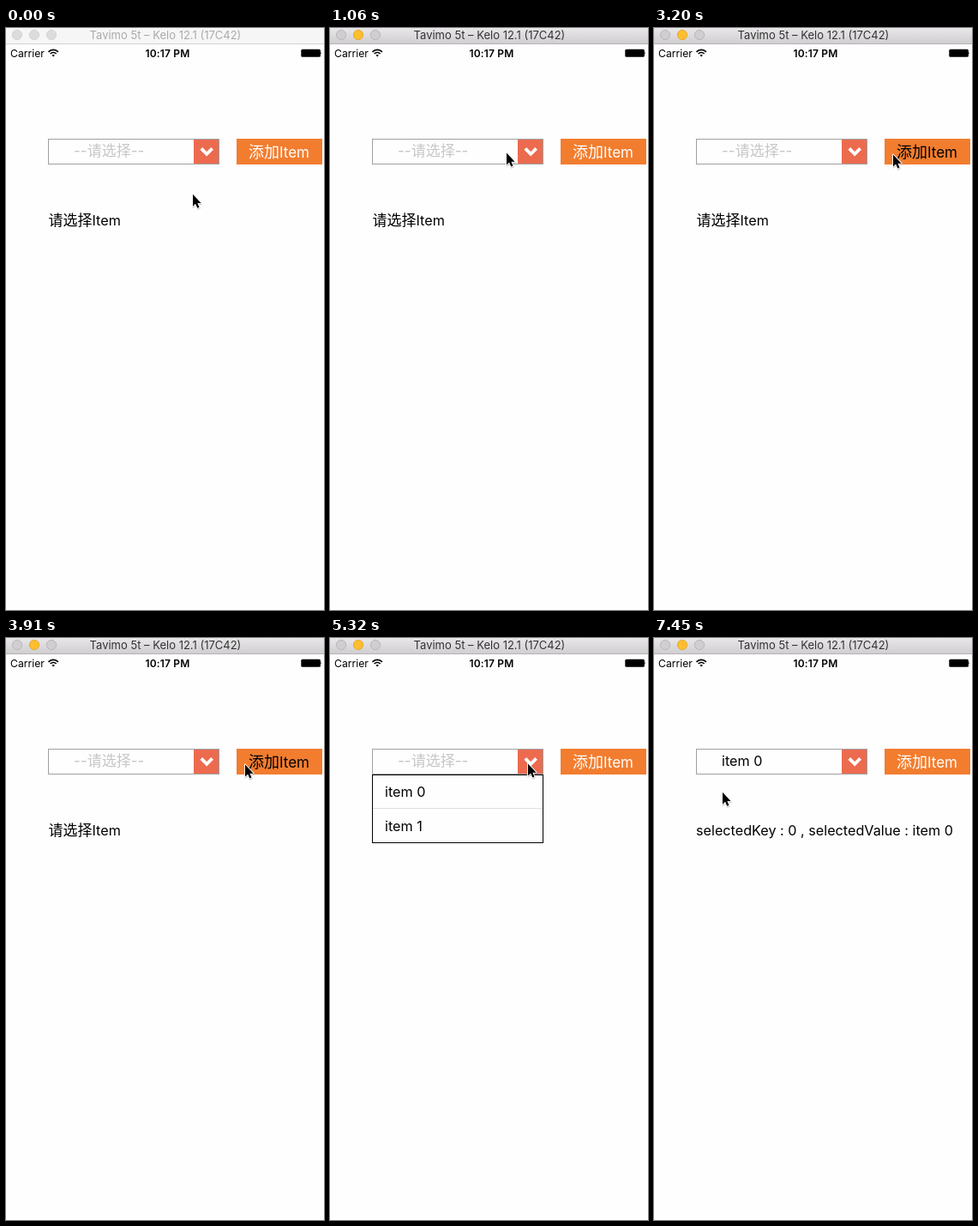
Animation, 371 px wide and 678 px high, one loop 8 s. Source, as an HTML page:

```html
<!DOCTYPE html>
<html lang="zh">
<head>
<meta charset="utf-8">
<title>Dropdown demo</title>
<style>
  html, body { margin: 0; width: 100%; height: 100%; overflow: hidden; background: #fefefe; }
  svg { display: block; width: 371px; height: 678px; }
  text { font: 16.2px Inter, "Noto Sans CJK SC", "Noto Sans CJK", sans-serif; white-space: pre; }
  .han { font-family: "Noto Sans CJK SC", "Noto Sans CJK", sans-serif; font-size: 17px; }
  .han tspan { font-family: Inter, sans-serif; }
</style>
</head>
<body>
<svg viewBox="0 0 371 678">
  <defs>
    <linearGradient id="chrome" x2="0" y2="1">
      <stop stop-color="#e9e7e9"/><stop offset="1" stop-color="#d0ced0"/>
    </linearGradient>
    <path id="arrow" d="M0 0V14L3.1 11.1 5.3 16 7.5 15 5.4 10.2H9.6Z"/>
  </defs>
  <rect width="371" height="678" fill="#fefefe"/>

  <rect id="bar" width="371" height="18"/>
  <rect id="edge" y="18" width="371" height="1"/>
  <g id="dots">
    <circle cx="13" cy="8" r="5.6"/><circle cx="33" cy="8" r="5.6"/><circle cx="53" cy="8" r="5.6"/>
  </g>
  <text id="title" x="186" y="13" text-anchor="middle" style="font-size:13px">Tavimo 5t – Kelo 12.1 (17C42)</text>

  <text x="5" y="33.5" style="font-size:12.2px">Carrier</text>
  <path d="M49.5 27.8a8 8 0 0 1 11.4 0M51.7 30a5 5 0 0 1 7 0" fill="none" stroke="#000" stroke-width="1.7"/>
  <path d="M53.5 31.8a2.4 2.4 0 0 1 3.4 0L55.2 33.5Z"/>
  <text x="188.5" y="33.5" text-anchor="middle" style="font-size:12px;font-weight:600;letter-spacing:.15px">10:17 PM</text>
  <rect x="344.3" y="24.8" width="22.6" height="9" rx="1.5"/>
  <path d="M367.4 27.8q1.5 1.5 0 3Z"/>

  <rect x="49.5" y="129.5" width="199" height="29" fill="#fefefe" stroke="#a0a0a0"/>
  <rect x="219" y="130" width="29" height="28" fill="#ec6b4f"/>
  <path d="M227.8 140.4l6.4 6.4 6.4-6.4" fill="none" stroke="#fff" stroke-width="3.8"/>
  <text id="hint" class="han" x="79" y="149" fill="#c7c7c7"><tspan>--</tspan>请选择<tspan>--</tspan></text>
  <text id="value" x="79" y="149">item 0</text>

  <rect x="269" y="129" width="100" height="30" fill="#f27d2f"/>
  <text id="add" class="han" x="283" y="150.5" style="font-size:18px">添加<tspan font-size="17">Item</tspan></text>

  <text id="prompt" class="han" x="49.5" y="230">请选择<tspan font-size="16.2">Item</tspan></text>
  <text id="result" x="49" y="230">selectedKey : 0 , selectedValue : item 0</text>

  <g id="list">
    <rect id="frame" x="49.5" y="159.5" width="199" fill="#fefefe" stroke="#000"/>
    <g id="rows">
      <path d="M50 198.5H248" stroke="#dedede"/>
      <text x="64" y="184.5">item 0</text>
      <text x="64" y="224.5">item 1</text>
    </g>
  </g>

  <g id="cursor" stroke-linejoin="round" stroke-width="1.8" paint-order="stroke">
    <use href="#arrow" x=".3" y="1.2" stroke="#000" opacity=".2"/>
    <use href="#arrow" stroke="#fff"/>
  </g>
</svg>
<script>
const LOOP = 8000;
const $ = id => document.getElementById(id);
const dots = [...$('dots').children];
const set = (el, attrs) => { for (const k in attrs) el.setAttribute(k, attrs[k]); };
const show = (id, on) => set($(id), { visibility: on ? 'visible' : 'hidden' });
const within = (t, a, b) => t >= a && t < b;

const smooth = u => u * u * (3 - 2 * u);
const easeIn = u => u ** 1.25;
const easeOut = u => 1 - (1 - u) ** 1.6;

// Pointer moves: first step, last step, step count, end point, easing.
const START = [218, 193.7];
const MOVES = [
  [240, 710, 9, [206, 145.5], smooth],
  [2080, 2250, 4, [253, 147.5], easeIn],
  [2308, 2480, 4, [279, 147.5], easeOut],
  [4570, 4680, 3, [251, 150], easeIn],
  [4738, 4960, 5, [231, 146.5], easeOut],
  [6640, 6640, 1, [222, 153.5], smooth],
  [6698, 7100, 8, [80, 179.7], smooth]
];

function pointer(t) {
  let p = START;
  for (const [a, b, n, q, ease] of MOVES) {
    if (t < a) break;
    const gap = (b - a) / (n - 1) || 1;
    const k = ease(Math.min(n, Math.floor((t - a) / gap + 1.01)) / n);
    p = p.map((v, i) => v + (q[i] - v) * k);
  }
  return p;
}

function draw(t) {
  const active = t >= 1060, chosen = t >= 7450;
  set($('bar'), { fill: active ? 'url(#chrome)' : '#f6f6f6' });
  set($('edge'), { fill: active ? '#b5b3b5' : '#d3d3d3' });
  set($('title'), { fill: active ? '#333' : '#aaa' });
  dots.forEach((dot, i) => set(dot, !active ? { fill: '#dcdcdc', stroke: '#d4d4d4' }
    : i === 1 ? { fill: '#fdbe30', stroke: '#e8a92e' }
    : { fill: '#d0ced0', stroke: '#b9b7b9' }));

  const empty = within(t, 1120, 1780), full = within(t, 5320, 7450);
  show('list', empty || full);
  set($('rows'), { display: full ? 'inline' : 'none' });
  set($('frame'), { height: full ? 79 : 49 });

  const pressed = within(t, 3200, 3380) || within(t, 3910, 4150);
  set($('add'), { fill: pressed ? '#000' : '#fff' });
  show('hint', !chosen);
  show('value', chosen);
  show('prompt', !chosen);
  show('result', chosen);
  set($('cursor'), { transform: `translate(${pointer(t)})` });
}

const begin = performance.now();
function tick() {
  draw((performance.now() - begin) % LOOP);
  requestAnimationFrame(tick);
}
tick();
</script>
</body>
</html>
```
